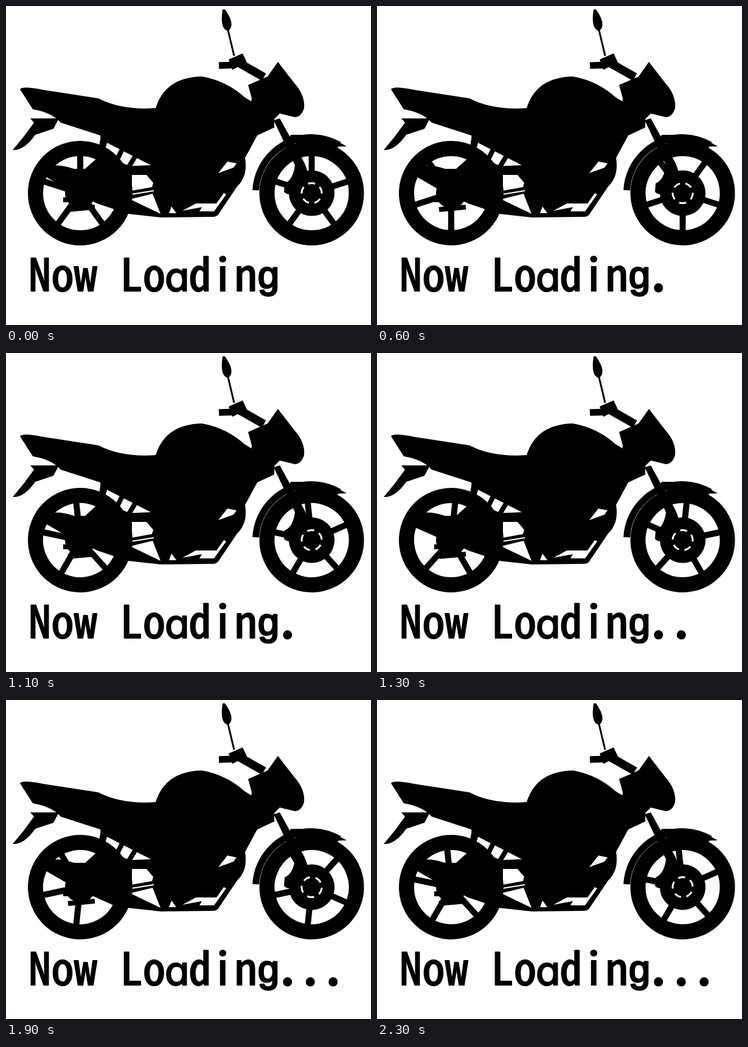
Write an HTML page with a canvas that moves like this. It is 600x525 px and loops after 2.4 s.

```html
<!DOCTYPE html>
<html lang="en">
<head>
<meta charset="utf-8">
<title>Now Loading</title>
<style>
html, body { margin: 0; width: 100%; height: 100%; overflow: hidden; background: #fff; }
canvas, svg { position: absolute; left: 0; top: 0; display: block; }
text {
  font: 400 74px "Noto Sans Mono CJK JP", "Noto Sans CJK JP", "Noto Sans Mono", monospace;
  text-anchor: middle; fill: #000; stroke: #000; stroke-width: 2.2; stroke-linejoin: round;
}
/* single-storey letters */
.a { font: 400 66px Inter, sans-serif; font-feature-settings: "cv11"; }
.g { font: 400 63px "Liberation Sans", sans-serif; stroke-width: 3; }
#dots { stroke-width: 5; }
</style>
</head>
<body>
<canvas id="stage" width="600" height="525"></canvas>
<svg width="600" height="525">
  <text id="label" y="468.5">Now Lo<tspan class="a">a</tspan>din<tspan class="g" dy="-5">g</tspan></text>
  <text id="dots" y="468"></text>
</svg>
<script>
const ctx = document.getElementById('stage').getContext('2d');
const label = document.getElementById('label');
const dots = document.getElementById('dots');
const LOOP = 2400, STEP = 100, TURN = 6;
const RAD = Math.PI / 180, FIFTH = 72 * RAD;
const INK = '#000', PAPER = '#fff';

const spread = (n, first, pitch) =>
  Array.from({ length: n }, (_, i) => first + i * pitch).join(' ');
label.setAttribute('x', spread(11, 55.5, 37.6));
dots.setAttribute('x', spread(3, 462.8, 37.5));

function fill(path, color = INK) {
  ctx.fillStyle = color;
  ctx.fill(new Path2D(path));
}

function line(path, width, color = INK) {
  ctx.strokeStyle = color;
  ctx.lineWidth = width;
  ctx.stroke(new Path2D(path));
}

function arc(r, width, from = 0, to = 360, color = INK) {
  ctx.strokeStyle = color;
  ctx.lineWidth = width;
  ctx.beginPath();
  ctx.arc(0, 0, r, from * RAD, to * RAD);
  ctx.stroke();
}

// run a drawing around an axle
function at(x, angle, paint) {
  ctx.save();
  ctx.translate(x, 308);
  ctx.rotate(angle);
  paint();
  ctx.restore();
}

function five(paint) {
  for (let i = 0; i < 5; i++) {
    paint();
    ctx.rotate(FIFTH);
  }
}

function wheel(x, angle, hub) {
  at(x, angle, () => {
    arc(73.5, 25);
    five(() => line('M0,0V-65', 10));
    arc(hub / 2, hub);
  });
}

function body() {
  // seat, tank and engine
  fill('M23,137Q27,131 61,138L152,152Q190,172 246,168Q262,117 322,116Q362,123 392,150L441,180V200L413,213 393,250Q398,280 380,297L349,343Q346,347 340,347L255,348 200,342 195,265 160,240 155,213 90,192Q75,175 44,170Z');
  // headlight and screen
  fill('M398,130L430,116 447,92 474,127Q492,147 490,168Q486,182 475,183L450,177 437,190 400,180 404,152Z');
  // handlebar
  line('M380,92L424,117', 14);
  line('M350,98L376,97', 11);
  fill('M366,88L389,78 396,93 372,105Z');
  // mirror
  fill('M356,6Q359,4 361,7Q378,32 365,41Q351,38 356,6Z');
  line('M365,40L375,82', 3);
  // plate holder
  fill('M40,185L87,185 78,202 48,212Q30,238 11,237Q30,215 46,192Z');
}

function gaps() {
  // rear frame with two struts
  fill('M166,225L238,262 190,264 160,245Z', PAPER);
  line('M191,236L177,264M215,243L200,268', 8);
  // beside the engine
  fill('M207,278L231,278 242,291 240,298 207,304Z', PAPER);
  line('M206,310L243,304', 2, PAPER);
  fill('M204,318L241,309 254,342Z', PAPER);
  // around the exhaust pipe
  fill('M268,341L272,330 280,341Z', PAPER);
  fill('M349,275L364,256 379,259 374,266Z', PAPER);
  fill('M290,337L312,325H346L358,308 362,310 342,338H318L322,331Z', PAPER);
}

function rearCover() {
  // silencer, swing arm and brake
  fill('M60,266Q85,258 112,268H130L150,250 156,213 167,222 160,245 200,262V342L150,325 98,300 60,278Z');
  line('M94,319H122M102,335L146,331', 8);
}

function frontCover() {
  fill('M440,188L450,185 486,250Q495,264 500,290L476,300Q468,316 457,306L458,292Q472,286 475,262Z');
  at(502, 0, () => arc(91.5, 11, 183, 300));
  fill('M462,224L468,212 500,212 540,220 560,231 530,232Z');
}

function discSlots() {
  five(() => arc(16.5, 3, -110, -70, PAPER));
}

function draw(step) {
  const angle = step * TURN * RAD;
  ctx.fillStyle = PAPER;
  ctx.fillRect(0, 0, 600, 525);
  body();
  gaps();
  wheel(122, angle, 25);
  wheel(502.5, angle, 37.5);
  rearCover();
  frontCover();
  at(502.5, angle, discSlots);
  dots.textContent = '.'.repeat(Math.floor(step / 6));
}

let last = -1;
function tick() {
  const step = Math.floor(performance.now() % LOOP / STEP);
  if (step !== last) draw(last = step);
  requestAnimationFrame(tick);
}
tick();
</script>
</body>
</html>
```
